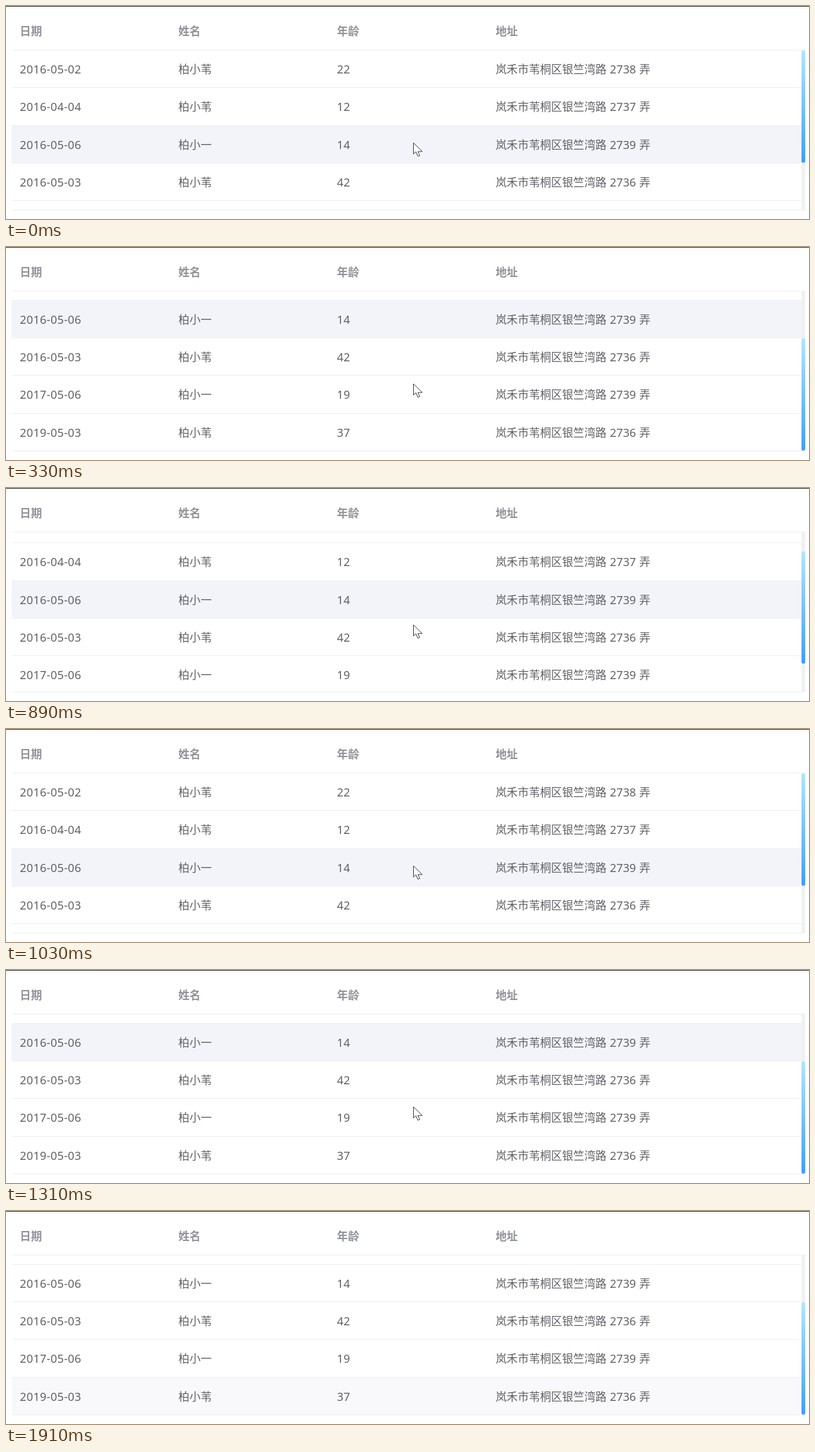
These frames come from a looping animation (1280 px wide and 341 px high, 2340 ms). An HTML page:

```html
<!DOCTYPE html>
<html lang="zh-CN">
<head>
<meta charset="utf-8">
<style>
  html, body { margin: 0; width: 100%; height: 100%; overflow: hidden; background: #fff; }
  .stage {
    position: relative; width: 1280px; height: 341px; overflow: hidden;
    border-top: 1px solid #222; box-sizing: border-box;
    font: 17.7px/60px "Noto Sans", "Noto Sans CJK SC", "Noto Sans CJK", sans-serif;
    color: #606266;
  }
  .stage * { box-sizing: border-box; }
  .head, .view, .list, .row, .cell, .track, .thumb, .cursor { position: absolute; }
  .head { left: 9px; top: 9px; width: 1265px; height: 61px; border-bottom: 1px solid #ebeef5; color: #909399; font-weight: 700; }
  .view { left: 9px; top: 70px; width: 1265px; height: 256px; overflow: hidden; border-bottom: 1px solid #ebeef5; }
  .list { left: 0; top: 0; }
  .row { left: 0; width: 1259px; height: 60.35px; border-bottom: 1px solid #ebeef5; }
  .cell { top: 0; height: 60px; white-space: pre; word-spacing: .6px; }
  .num { font-size: 18.2px; }
  .date { letter-spacing: .3px; }
  .track { right: 0; top: 0; width: 6px; height: 255px; background: #f1f1f1; }
  .thumb { left: 0; top: 0; width: 6px; height: 180px; border-radius: 3px; background: linear-gradient(#b3e5fc, #409eff); }
  .cursor { left: 0; top: -1px; width: 18px; height: 26px; overflow: visible; }
</style>
</head>
<body>
<div class="stage">
  <div class="head"></div>
  <div class="view">
    <div class="list"></div>
    <div class="track"><div class="thumb"></div></div>
  </div>
  <svg class="cursor" viewBox="0 0 18 26">
    <path d="M.5 .5V18.5L4.5 14.8L7.5 22L10.5 20.8L7.6 14.5H14.5Z" fill="#fff" stroke="#333"/>
  </svg>
</div>
<script>
const LOOP = 2340, TICK = 46.8, FADE = 250 / TICK;
const ROW = 60.35, MAX_SCROLL = 106, MAX_THUMB = 75;
const find = s => document.querySelector(s);
const list = find('.list'), thumb = find('.thumb'), cursor = find('.cursor');

const data = [
  ['2016-05-02', '柏小苇', 22, 2738],
  ['2016-04-04', '柏小苇', 12, 2737],
  ['2016-05-06', '柏小一', 14, 2739],
  ['2016-05-03', '柏小苇', 42, 2736],
  ['2017-05-06', '柏小一', 19, 2739],
  ['2019-05-03', '柏小苇', 37, 2736]
];
const cells = items => items.map((html, i) =>
  `<div class="cell" style="left:${13 + i * 252.8}px">${html}</div>`).join('');
const num = (text, extra = '') => `<span class="num ${extra}">${text}</span>`;

find('.head').innerHTML = cells(['日期', '姓名', '年龄', '地址']);
list.innerHTML = data.map(([date, name, age, lane], i) =>
  `<div class="row" style="top:${i * ROW}px">${cells([
    num(date, 'date'), name, num(age), `岚禾市苇桐区银竺湾路${num(` ${lane} `)}弄`
  ])}</div>`).join('');
const rows = list.children;

const clamp = x => Math.min(1, Math.max(0, x));
const smooth = x => x * x * (3 - 2 * x);
const glide = (k, start, end, power = 1) => smooth(clamp((k - start) / (end - start)) ** power);

// CSS-like "ease" for the row highlight
const ease = x => 1 - (1 - clamp(x)) ** 2;
function hover(k, enter, leave) {
  const peak = ease((Math.min(k, leave) - enter) / FADE);
  return peak * (1 - ease((k - leave) / FADE));
}

function draw(ms) {
  const k = Math.floor((ms % LOOP + 9) / TICK);

  const pos = glide(k, 1.8, 7) - glide(k, 16, 22, .822) + glide(k, 23.2, 28);
  list.style.transform = `translateY(${-Math.round(pos * MAX_SCROLL)}px)`;
  thumb.style.transform = `translateY(${pos * MAX_THUMB}px)`;

  const tint = (i, a) => rows[i].style.backgroundColor = `rgba(243,244,250,${a})`;
  tint(2, hover(k, -9, 31.5));
  tint(4, hover(k, 31.5, 35));
  tint(5, hover(k, 35, 39.6));

  const drop = Math.max(0, k - 31.5) * 13.2;
  cursor.style.transform = `translate(649px,${218.5 + drop}px)`;
}

const begin = performance.now();
function loop() {
  draw(performance.now() - begin);
  requestAnimationFrame(loop);
}
loop();
</script>
</body>
</html>
```
